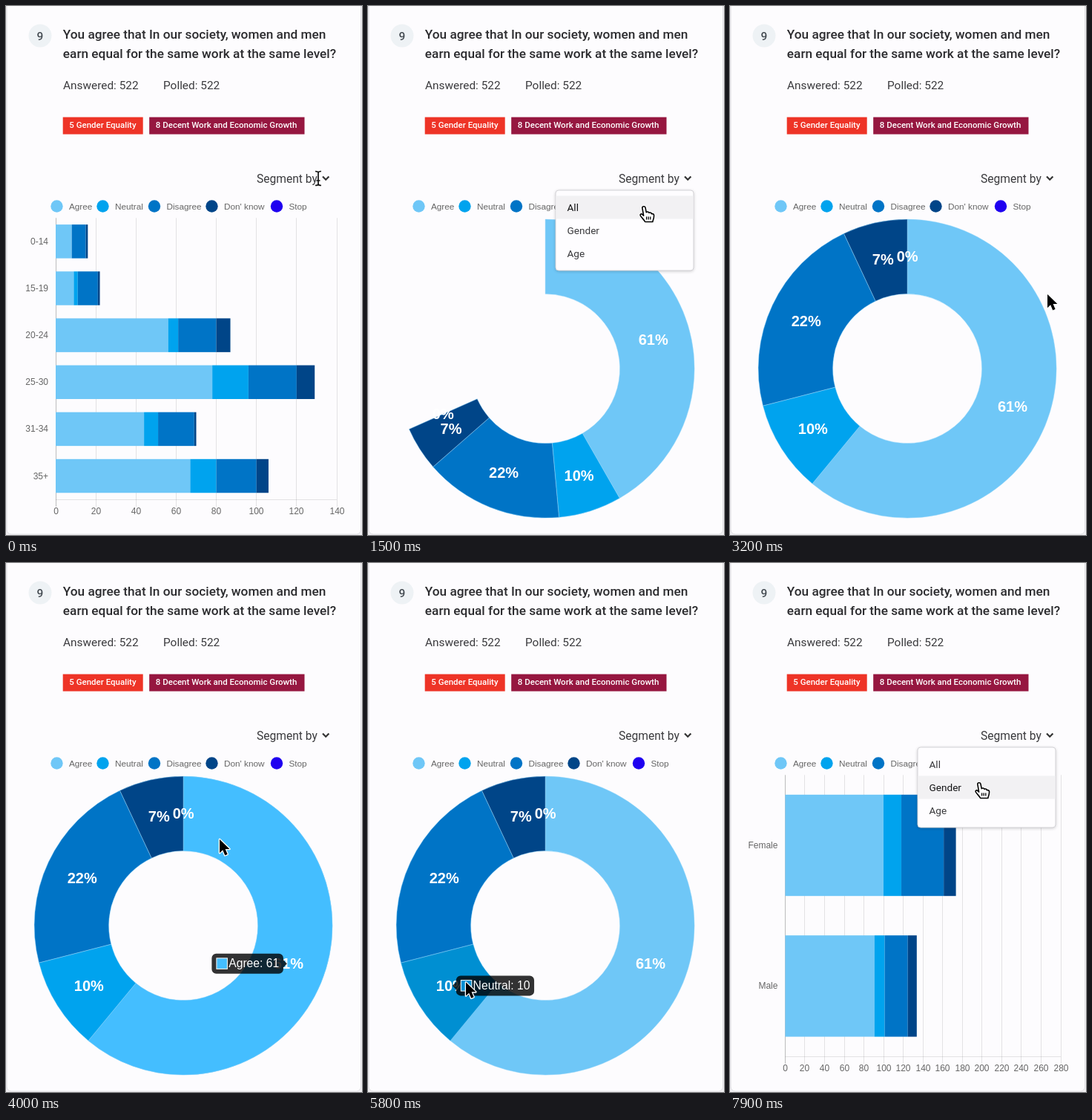
An HTML page with a canvas that plays this animation: 480x712 px, repeating every 8000 ms.

```html
<!DOCTYPE html>
<html lang="en">
<head>
<meta charset="utf-8">
<title>Survey result</title>
<style>
  html, body { margin: 0; width: 100%; height: 100%; overflow: hidden; background: #f1f0f3; }
  canvas { display: block; width: 480px; height: 712px; }
</style>
</head>
<body>
<canvas id="stage"></canvas>
<script>
const LOOP = 8000;
const canvas = document.getElementById('stage');
const dpr = window.devicePixelRatio || 1;
canvas.width = 480 * dpr;
canvas.height = 712 * dpr;
const ctx = canvas.getContext('2d');

const UI = 'Roboto, sans-serif';
const CHART = '"Liberation Sans", Arial, sans-serif';
const COLORS = ['#6fc7f7', '#00a3ee', '#0074c6', '#004588', '#1f00f0'];
const HOVER = ['#44beff', '#008fd2', '#0062aa', '#003a73', '#1b00d0'];
const NAMES = ['Agree', 'Neutral', 'Disagree', "Don' know", 'Stop'];
const SHARES = [61, 10, 22, 7, 0];
const MENU_ITEMS = ['All', 'Gender', 'Age'];

const BY_AGE = {
  left: 67, max: 140,
  rows: [['0-14', 8, 0, 7, 1], ['15-19', 9, 2, 10, 1], ['20-24', 56, 5, 19, 7],
         ['25-30', 78, 18, 24, 9], ['31-34', 44, 7, 18, 1], ['35+', 67, 13, 20, 6]]
};
const BY_GENDER = {
  left: 74.4, max: 280,
  rows: [['Female', 153, 28, 66, 19], ['Male', 139, 16, 36, 14]]
};

// Chart switches, and the spans in which the menu is open
const PICK_ALL = 1251, PICK_GENDER = 7669;
const MENU_OPEN = [[450, 1680], [6850, LOOP]];

// Pointer path: time, x, y
const PATH = [
  [0, 421, 232], [150, 421, 232], [400, 412, 234], [550, 408, 238], [950, 374, 268],
  [1250, 372, 270], [1700, 372, 270], [2300, 452, 375], [2700, 464, 400], [3200, 428, 388],
  [3750, 345, 372], [4300, 214, 372], [4700, 208, 382], [4900, 206, 378], [5350, 112, 452],
  [5700, 132, 564], [5950, 132, 565], [6350, 325, 545], [6750, 402, 232], [6900, 398, 230],
  [7100, 380, 217], [7500, 337, 294], [7650, 336, 296], [8000, 336, 296]
];

const RING = { x: 239.1, y: 488.1, outer: 201, inner: 100.5 };
const clamp = v => Math.max(0, Math.min(1, v));
const smooth = v => v * v * (3 - 2 * v);
const outQuart = v => 1 - (1 - clamp(v)) ** 4;

function pointerAt(t) {
  let i = 0;
  while (i < PATH.length - 2 && PATH[i + 1][0] <= t) i++;
  const [t0, x0, y0] = PATH[i], [t1, x1, y1] = PATH[i + 1];
  const k = smooth(clamp((t - t0) / (t1 - t0)));
  return { x: x0 + (x1 - x0) * k, y: y0 + (y1 - y0) * k };
}

const menuOpen = t => MENU_OPEN.some(([a, b]) => t >= a && t < b);

function menuItemAt(p) {
  const row = Math.floor((p.y - 255.5) / 31);
  return p.x > 253 && p.x < 439 && row >= 0 && row < 3 ? row : -1;
}

function sliceAt(t) {
  if (t < PICK_ALL + 1000 || menuOpen(t)) return -1;
  const p = pointerAt(t), dx = p.x - RING.x, dy = p.y - RING.y;
  const r = Math.hypot(dx, dy);
  if (r < RING.inner || r > RING.outer) return -1;
  let rest = ((Math.atan2(dx, -dy) / (2 * Math.PI) + 1) % 1) * 100;
  return SHARES.findIndex(s => (rest -= s) < 0);
}

function hoverAge(t, slice) {
  let age = 0;
  while (age < 300 && sliceAt(t - age) === slice) age += 10;
  return age;
}

function text(str, x, y, font, color, align = 'left') {
  ctx.font = font;
  ctx.fillStyle = color;
  ctx.textAlign = align;
  ctx.textBaseline = 'alphabetic';
  ctx.fillText(str, x, y);
}

function rect(x, y, w, h, color) {
  ctx.fillStyle = color;
  ctx.fillRect(x, y, w, h);
}

function dot(x, y, r, color) {
  ctx.beginPath();
  ctx.arc(x, y, r, 0, 7);
  ctx.fillStyle = color;
  ctx.fill();
}

function line(x0, y0, x1, y1, color) {
  ctx.beginPath();
  ctx.moveTo(x0, y0);
  ctx.lineTo(x1, y1);
  ctx.strokeStyle = color;
  ctx.lineWidth = 1;
  ctx.stroke();
}

function drawCard() {
  rect(0, 0, 480, 712, '#f1f0f3');
  ctx.beginPath();
  ctx.roundRect(1, -10, 477.5, 721, 6);
  ctx.fillStyle = '#fdfcfe';
  ctx.fill();
  ctx.strokeStyle = '#dfdee2';
  ctx.lineWidth = 1;
  ctx.stroke();

  dot(46, 40, 15.5, '#eef2f5');
  text('9', 46, 45.5, '500 15.5px ' + UI, '#444b52', 'center');
  const title = '500 17.25px ' + UI;
  text('You agree that In our society, women and men', 76.8, 44, title, '#2b2b2e');
  text('earn equal for the same work at the same level?', 76.8, 69.5, title, '#2b2b2e');
  text('Answered: 522', 77, 112.3, '15.4px ' + UI, '#3a3a3d');
  text('Polled: 522', 212, 112.3, '15.4px ' + UI, '#3a3a3d');
  rect(76.7, 149.6, 108, 23, '#ee3427');
  rect(193.2, 149.6, 209.3, 23, '#961740');
  text('5 Gender Equality', 85.3, 164.2, '500 11.5px ' + UI, '#fff');
  text('8 Decent Work and Economic Growth', 201.8, 164.2, '500 11.5px ' + UI, '#fff');

  text('Segment by', 338, 237.5, '15.6px ' + UI, '#3a3a3d');
  ctx.beginPath();
  ctx.moveTo(427, 229.5);
  ctx.lineTo(431.2, 233.7);
  ctx.lineTo(435.4, 229.5);
  ctx.strokeStyle = '#333';
  ctx.lineWidth = 2.2;
  ctx.stroke();
}

function drawLegend() {
  [68.5, 130.5, 200, 277.5, 365].forEach((x, i) => {
    dot(x, 269.5, 8.2, COLORS[i]);
    text(NAMES[i], x + 16.4, 273.5, '11.8px ' + CHART, '#666');
  });
}

function drawBars({ left, max, rows }, grow) {
  const top = 285.3, bottom = 664.1, unit = (446 - left) / max;
  for (let v = 0; v <= max; v += 20) {
    const x = Math.floor(left + v * unit) + 0.5;
    line(x, top, x, 674, v ? 'rgba(0,0,0,.1)' : 'rgba(0,0,0,.25)');
    text(v, x, 683.5, '12px ' + CHART, '#666', 'center');
  }
  line(left, 664.5, 446, 664.5, 'rgba(0,0,0,.1)');
  const pitch = (bottom - top) / rows.length, h = pitch * 0.72;
  rows.forEach(([label, ...values], i) => {
    const mid = top + pitch * (i + 0.5);
    text(label, left - 10, mid + 4, '12px ' + CHART, '#666', 'right');
    let x = left;
    values.forEach((v, n) => {
      const w = v * unit * grow;
      rect(x, mid - h / 2, w, h, COLORS[n]);
      x += w;
    });
  });
}

function drawRing(grow, hover, age) {
  const { x, y, outer, inner } = RING;
  const mid = (outer + inner) / 2, turn = 2 * Math.PI * grow / 100;
  const centers = [];
  let sum = 0;
  SHARES.forEach((share, i) => {
    const a = sum * turn - Math.PI / 2, b = (sum + share) * turn - Math.PI / 2;
    const m = (a + b) / 2;
    centers.push([x + mid * Math.cos(m), y + mid * Math.sin(m)]);
    sum += share;
    if (!share) return;
    ctx.beginPath();
    ctx.arc(x, y, outer, a, b);
    ctx.arc(x, y, inner, b, a, true);
    ctx.closePath();
    ctx.fillStyle = COLORS[i];
    ctx.fill();
    if (i === hover) {
      ctx.globalAlpha = outQuart(age / 300);
      ctx.fillStyle = HOVER[i];
      ctx.fill();
      ctx.globalAlpha = 1;
    }
    ctx.strokeStyle = 'rgba(150,215,250,.6)';
    ctx.lineWidth = 0.8;
    ctx.stroke();
  });
  centers.forEach(([cx, cy], i) =>
    text(SHARES[i] + '%', cx, cy + 7, 'bold 20px ' + CHART, '#fff', 'center'));
  if (hover >= 0) drawTip(hover, ...centers[hover], outQuart(age / 300));
}

function drawTip(i, cx, cy, alpha) {
  const label = NAMES[i] + ': ' + SHARES[i], font = '15.7px ' + CHART;
  ctx.font = font;
  const w = ctx.measureText(label).width + 28.5;
  const side = cx + 7 + w > 455 ? -1 : 1;
  const left = side > 0 ? cx + 7 : cx - 7 - w, edge = cx + 7 * side;
  ctx.globalAlpha = alpha;
  ctx.beginPath();
  ctx.roundRect(left, cy - 13.5, w, 27, 6);
  ctx.moveTo(edge, cy - 5);
  ctx.lineTo(edge - 5 * side, cy);
  ctx.lineTo(edge, cy + 5);
  ctx.fillStyle = 'rgba(0,0,0,.8)';
  ctx.fill();
  rect(left + 6, cy - 7.8, 15.5, 15.5, '#fff');
  rect(left + 7, cy - 6.8, 13.5, 13.5, HOVER[i]);
  text(label, left + 22.8, cy + 5.3, font, '#fff');
  ctx.globalAlpha = 1;
}

function drawMenu(active) {
  ctx.save();
  ctx.shadowColor = 'rgba(0,0,0,.22)';
  ctx.shadowBlur = 4;
  ctx.shadowOffsetY = 1;
  ctx.beginPath();
  ctx.roundRect(253, 248, 186, 108, 4);
  ctx.fillStyle = '#fefdff';
  ctx.fill();
  ctx.restore();
  ctx.strokeStyle = '#d4d3d7';
  ctx.lineWidth = 1;
  ctx.stroke();
  if (active >= 0) rect(253.5, 255.5 + active * 31, 185, 31, '#f2f1f3');
  MENU_ITEMS.forEach((item, i) =>
    text(item, 268.5, 276 + i * 31, '13.6px ' + UI, i === active ? '#151517' : '#3a3a3d'));
}

const ARROW = new Path2D('M0 0V18.2L4.2 14.3L7.2 21.4L10.6 20L7.6 13H13.4Z');
const HAND = new Path2D('M-2.2 1.6C-2.2-.8 1.6-.8 2 1.4L3.2 7.6C4.6 6.4 6.6 7 6.9 8.4' +
  'C8.4 7.6 10.2 8.4 10.4 9.8C12 9.2 13.6 10.2 13.6 12C13.6 16 12.6 17 11.8 20.5H1.6' +
  'C0 17.4-2.6 15.4-4.6 12.4C-5.8 10.2-3.6 9.2-2 10.6L-.4 12.2Z');
const HAND_LINES = new Path2D('M3.6 13.5V17.5M6.2 13.5V17.5M8.8 13.5V17.5');
const BEAM = new Path2D('M-4-9.5C-1.5-9.5 0-9 0-7.5C0-9 1.5-9.5 4-9.5M0-7.5V7.5' +
  'M-4 9.5C-1.5 9.5 0 9 0 7.5C0 9 1.5 9.5 4 9.5M-2.5 3H2.5');

function drawPointer(p, kind) {
  const stroke = (path, width, color) => {
    ctx.lineWidth = width;
    ctx.strokeStyle = color;
    ctx.stroke(path);
  };
  ctx.save();
  ctx.translate(p.x, p.y);
  ctx.lineJoin = 'round';
  if (kind === 'beam') {
    stroke(BEAM, 3.4, 'rgba(255,255,255,.8)');
    stroke(BEAM, 1.7, '#111');
  } else if (kind === 'hand') {
    stroke(HAND, 3.2, 'rgba(255,255,255,.9)');
    ctx.fillStyle = '#fff';
    ctx.fill(HAND);
    stroke(HAND, 1.6, '#000');
    stroke(HAND_LINES, 1.3, '#000');
  } else {
    stroke(ARROW, 2.6, '#fff');
    ctx.fillStyle = '#000';
    ctx.fill(ARROW);
  }
  ctx.restore();
}

function draw(t) {
  ctx.setTransform(dpr, 0, 0, dpr, 0, 0);
  const p = pointerAt(t), open = menuOpen(t);
  const item = open ? menuItemAt(p) : -1;
  drawCard();
  drawLegend();
  if (t < PICK_ALL) {
    drawBars(BY_AGE, 1);
  } else if (t < PICK_GENDER) {
    const hover = sliceAt(t);
    drawRing(outQuart((t - PICK_ALL) / 1000), hover, hover < 0 ? 0 : hoverAge(t, hover));
  } else {
    drawBars(BY_GENDER, outQuart((t - PICK_GENDER) / 1000));
  }
  if (open) drawMenu(item);
  const onLabel = !open && p.x > 338 && p.x < 424 && p.y > 222 && p.y < 243;
  drawPointer(p, item >= 0 ? 'hand' : onLabel ? 'beam' : 'arrow');
}

function tick() {
  draw(performance.now() % LOOP);
  requestAnimationFrame(tick);
}
tick();
</script>
</body>
</html>
```
